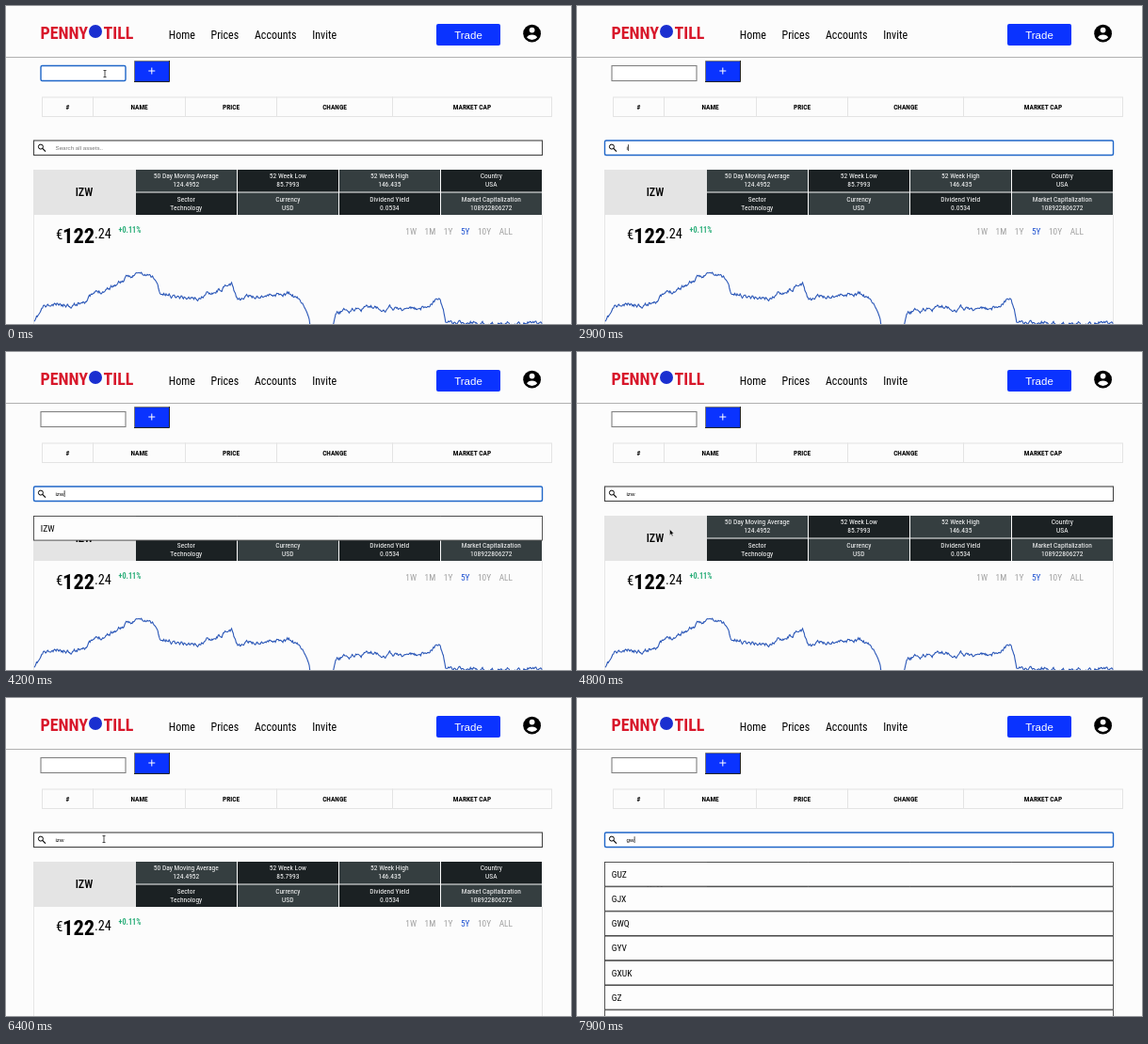
These frames come from a looping animation (600x338 px, 8 s). An HTML page:

```html
<!DOCTYPE html>
<html lang="en">
<head>
<meta charset="utf-8">
<title>Stock dashboard</title>
<style>
html, body { margin: 0; width: 100%; height: 100%; overflow: hidden; background: #fcfcfc; }
svg { display: block; width: 600px; height: 338px; }
text { font-family: "Roboto Condensed", Roboto, sans-serif; font-stretch: 75%; }
.sans { font-family: "Liberation Sans", Arial, sans-serif; font-stretch: normal; }
</style>
</head>
<body>
<svg id="stage" viewBox="0 0 600 338"></svg>
<script>
const LOOP = 8000, STEP = 100;
const stage = document.getElementById('stage');

function add(tag, attrs, parent = stage) {
  const node = document.createElementNS('http://www.w3.org/2000/svg', tag);
  for (const key in attrs) node.setAttribute(key, attrs[key]);
  return parent.appendChild(node);
}
const rect = (x, y, width, height, fill, more, parent) =>
  add('rect', { x, y, width, height, fill, ...more }, parent);
const path = (d, more) => add('path', { d, fill: 'none', ...more });
function label(str, x, y, size, more, parent) {
  const node = add('text', { x, y, 'font-size': size, ...more }, parent);
  node.textContent = str;
  return node;
}
// Sets words side by side with an even gap
function wordRow(words, x, y, size, gap, style) {
  for (const word of words.split(' '))
    x += label(word, x, y, size, style(word)).getComputedTextLength() + gap;
}
const mid = { 'text-anchor': 'middle' };
const bold = { 'font-weight': 700 };
const show = (node, on) => node.setAttribute('visibility', on ? 'visible' : 'hidden');
const mix = (a, b, k) => a + (b - a) * k;

// Finds the pair of keys around a value of their first column
function between(keys, at) {
  const i = keys.findIndex(key => key[0] > at);
  const a = keys[i - 1], b = keys[i];
  return [a, b, (at - a[0]) / (b[0] - a[0])];
}

// Header
const brand = { fill: '#d8172b', ...bold };
label('PENNY', 36.5, 35, 18, brand);
add('circle', { cx: 95, cy: 27, r: 7, fill: '#1a2fd0' });
label('TILL', 103.5, 35, 18, brand);
wordRow('Home Prices Accounts Invite', 172.7, 34.5, 12, 16.7, () => ({}));
rect(457, 19, 68, 23, '#0a33ff', { rx: 2 });
label('Trade', 491, 34.5, 11.5, { ...mid, fill: '#fff', class: 'sans' });
add('circle', { cx: 558.6, cy: 29.2, r: 9.4 });
add('circle', { cx: 558.6, cy: 25.6, r: 2.9, fill: '#fff' });
path('M553 33.2Q554.5 30.6 558.6 30.4Q562.7 30.6 564.2 33.2Q562 36.1 558.6 36.1T553 33.2Z', { fill: '#fff' });
rect(0, 54, 600, 1, '#b0b0b0');

// Ticker entry and watch-list table
const entry = rect(37, 63.5, 90, 16, '#fff');
rect(136.5, 58.5, 37, 22, '#0a33ff');
path('M136.5 81V58.5H174', { stroke: '#777' });
path('M136 80.5H173.5V58', { stroke: '#222' });
path('M151.3 69H158.3M154.8 65.5V72.5', { stroke: '#fff' });
const edges = [38.5, 92.5, 190.5, 287.5, 410.5, 579.5];
['#', 'NAME', 'PRICE', 'CHANGE', 'MARKET CAP'].forEach((title, i) => {
  const x = edges[i], width = edges[i + 1] - x;
  rect(x, 97, width, 20.5, 'none', { stroke: '#e4e4e4' });
  label(title, x + width / 2, 110, 7.4, { ...mid, ...bold });
});

// Search field
const search = rect(29.5, 143, 540, 15.5, '#fff');
add('circle', { cx: 36.9, cy: 149.6, r: 2.5, fill: 'none', stroke: '#000' });
path('M38.7 151.4L42 154.6', { stroke: '#000', 'stroke-width': 1.2 });
const query = label('', 52.5, 152.9, 6.2, { class: 'sans' });
const caret = rect(53, 147.2, .7, 6.8, '#000');

// Company facts
rect(29, 174, 109, 48, '#e4e4e4');
label('IZW', 83, 202, 12, { ...mid, 'font-weight': 500 });
[
  '50 Day Moving Average|124.4952', '52 Week Low|85.7993', '52 Week High|146.435', 'Country|USA',
  'Sector|Technology', 'Currency|USD', 'Dividend Yield|0.0534', 'Market Capitalization|108922806272'
].forEach((fact, i) => {
  const col = i % 4, row = i >> 2, x = 138 + col * 108, y = 174 + row * 24.5;
  rect(x, y, 107, 23.5, (col + row) % 2 ? '#1b2123' : '#353e40');
  fact.split('|').forEach((str, j) =>
    label(str, x + 53.3, y + 9.4 + j * 9, 7.5, { ...mid, fill: '#fff' }));
});

// Price and chart
path('M29.5 222V338M569.5 222V338', { stroke: '#e6e6e6' });
label('€', 53, 247.5, 15);
label('122', 60, 252, 22.5, bold);
label('.24', 94, 247.2, 14.3);
label('+0.11%', 119.5, 241, 8.2, { fill: '#2cae7a', ...bold });
wordRow('1W 1M 1Y 5Y 10Y ALL', 424.3, 242.8, 9.3, 8.6,
  word => ({ fill: word === '5Y' ? '#1a4fd0' : '#a0a0a0' }));

// Seeded noise that drifts around a coarse trend
const trend = [
  [30, 337], [40, 320], [75, 316], [103, 302], [140, 284], [158, 289], [164, 306], [205, 311],
  [218, 303], [240, 297], [246, 312], [275, 307], [300, 306], [317, 317], [323, 342], [346, 341],
  [351, 325], [390, 320], [440, 323], [461, 309], [467, 336], [571, 338]
];
let seed = 11, drift = 0;
const random = () => (seed = seed * 16807 % 2147483647) / 2147483647;
const points = [];
for (let x = 30; x < 570; x += .8) {
  const [a, b, k] = between(trend, x);
  drift = drift * .8 + (random() - .5) * 3.6;
  points.push(`${x.toFixed(1)} ${(mix(a[1], b[1], k) + drift).toFixed(1)}`);
}
const chart = path('M' + points.join('L'), { stroke: '#2c58b8', 'stroke-width': 1.1 });

// Suggestion lists
function suggestions(names) {
  const group = add('g', {});
  names.split(' ').forEach((name, i) => {
    const y = 174.5 + i * 26.2;
    rect(29.5, y, 540, 25.6, '#fdfdfd', { stroke: '#444', 'stroke-width': .9 }, group);
    label(name, 36.8, y + 16.3, 9.6, {}, group);
  });
  return group;
}
const lists = {
  i: suggestions('IXV IJ IVQK IUW IZW IY IKX'),
  one: suggestions('IZW'),
  g: suggestions('GUZ GJX GWQ GYV GXUK GZ GVO')
};

// Pointer
const arrow = path('M0 0V6.2L1.5 4.9L2.5 7.2L3.5 6.7L2.5 4.5H4.4Z', { fill: '#000', stroke: '#fff', 'stroke-width': .4 });
const beam = path('M-1.5 -3.5H1.5M0 -3.5V3.5M-1.5 3.5H1.5', { stroke: '#222', 'stroke-width': .8 });
const route = [
  [0, 105, 72], [1200, 105, 72], [1800, 110, 138], [2100, 105, 150], [4300, 105, 152],
  [4700, 98.5, 188.5], [5600, 98.5, 188.5], [6200, 104, 150], [LOOP, 104, 150]
];
function pointerAt(t) {
  const [a, b, u] = between(route, t);
  const k = u * u * (3 - 2 * u);
  return [mix(a[1], b[1], k), mix(a[2], b[2], k)];
}

// Timed states: the last entry already reached applies
const typed = [[0, ''], [2900, 'i'], [3500, 'iz'], [3800, 'izw'], [6900, ''], [7200, 'g'], [7700, 'gw']];
const opened = [[0, ''], [3100, 'i'], [3700, 'one'], [4700, ''], [7400, 'g']];
const focused = [[0, 'entry'], [2200, 'search'], [4700, ''], [6600, 'search']];
const current = (states, t) => states.filter(([start]) => start <= t).pop()[1];

function outline(box, on, idle) {
  box.setAttribute('stroke', on ? '#1f66c8' : idle);
  box.setAttribute('stroke-width', on ? 1.4 : 1.1);
  box.setAttribute('rx', on ? 1.5 : 0);
}

function draw(now) {
  const t = Math.floor(now % LOOP / STEP) * STEP;
  const text = current(typed, t), list = current(opened, t), focus = current(focused, t);

  outline(entry, focus === 'entry', '#808080');
  outline(search, focus === 'search', '#444');
  query.textContent = text || 'Search all assets..';
  query.setAttribute('fill', text ? '#000' : '#757575');
  caret.setAttribute('x', 52.8 + (text ? query.getComputedTextLength() : 0));
  show(caret, focus === 'search');
  for (const key in lists) show(lists[key], key === list);
  show(chart, t < 5500);

  const [x, y] = pointerAt(t);
  const typing = t >= 2900 && t < 4300 || t >= 6900;
  const overField = y > 63 && y < 80 || y > 143 && y < 159;
  show(arrow, !typing && !overField);
  show(beam, !typing && overField);
  for (const shape of [arrow, beam]) shape.setAttribute('transform', `translate(${x} ${y})`);
  requestAnimationFrame(() => draw(performance.now() - begin));
}
const begin = performance.now();
draw(0);
</script>
</body>
</html>
```
